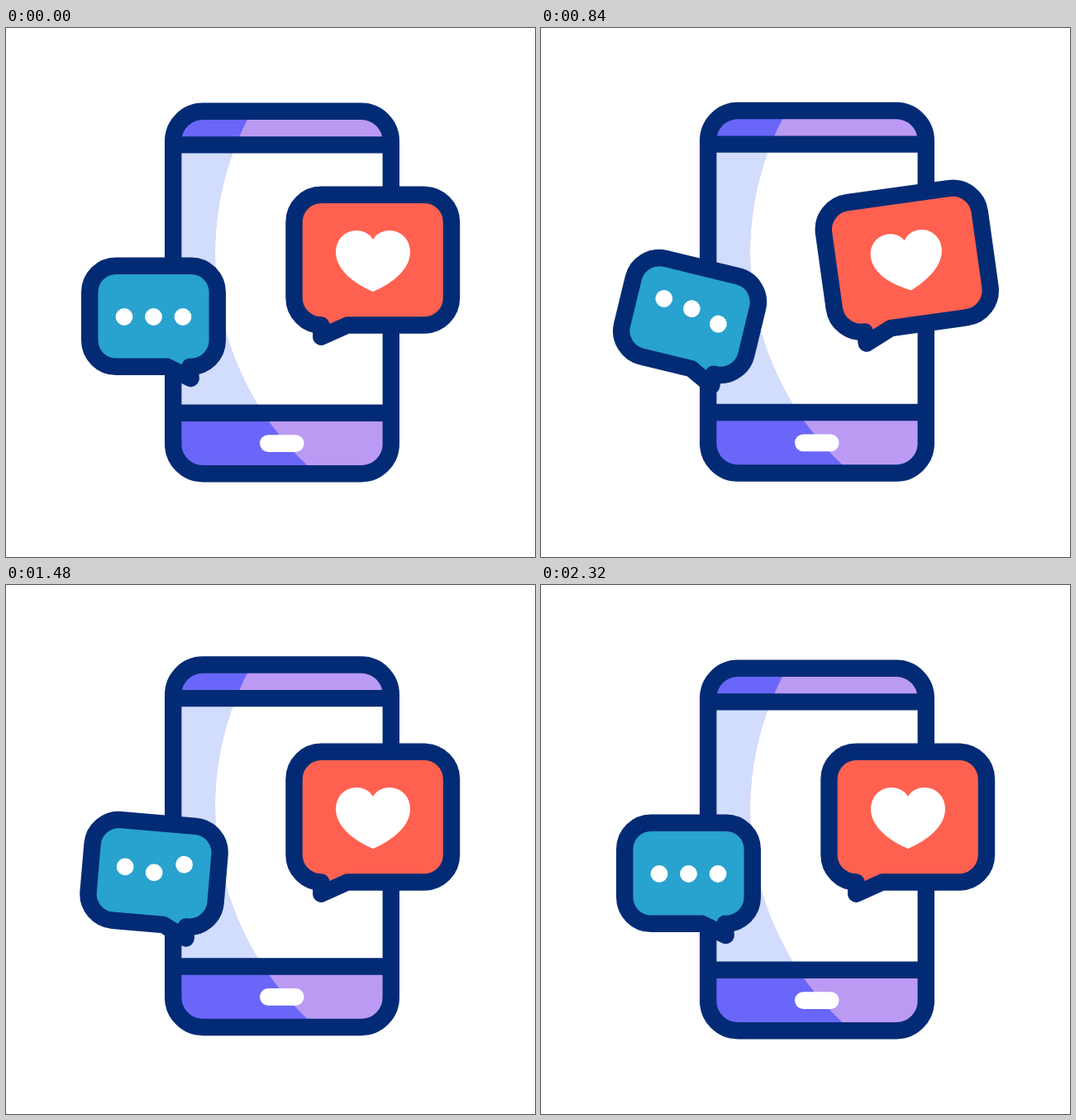
These frames come from a looping animation (640 by 640 pixels, 2440 ms). An HTML page:

```html
<!DOCTYPE html>
<html lang="en">
<head>
<meta charset="utf-8">
<title>Phone chat</title>
<style>
  html, body { margin: 0; width: 100%; height: 100%; overflow: hidden; background: #fff; }
  svg { display: block; width: 100vw; height: 100vh; }
  .line { stroke: #032b75; stroke-width: 20.4; stroke-linejoin: round; }
</style>
</head>
<body>
<svg viewBox="0 0 640 640">
  <defs>
    <clipPath id="case"><rect x="202.2" y="100.8" width="263.6" height="438.4" rx="36"/></clipPath>
  </defs>

  <g id="phone">
    <g clip-path="url(#case)">
      <rect x="192" y="90" width="284" height="460" fill="#6a66f9"/>
      <rect x="192" y="141" width="284" height="325" fill="#d2dcfd"/>
      <g clip-path="url(#case)">
        <circle cx="605" cy="272" r="352" fill="#bb9af3"/>
      </g>
      <clipPath id="screen"><rect x="192" y="141" width="284" height="325"/></clipPath>
      <circle cx="605" cy="272" r="352" fill="#fff" clip-path="url(#screen)"/>
    </g>
    <rect class="line" x="202.2" y="100.8" width="263.6" height="438.4" rx="36" fill="none"/>
    <path class="line" d="M202 141.4H466M202 465.8H466"/>
    <rect x="307" y="492.3" width="53.6" height="20.6" rx="10.3" fill="#fff"/>
  </g>

  <g id="chat">
    <path class="line" fill="#28a2ce" d="M133.2 287.7H223.8A32 32 0 0 1 255.8 319.7V377.8
      A32 32 0 0 1 222.5 409.8L223.7 424L195 409.8H133.2A32 32 0 0 1 101.2 377.8V319.7A32 32 0 0 1 133.2 287.7Z"/>
    <g fill="#fff">
      <circle class="dot" cx="143" cy="349.5" r="10.4"/>
      <circle class="dot" cx="178.5" cy="349.5" r="10.4"/>
      <circle class="dot" cx="214" cy="349.5" r="10.4"/>
    </g>
  </g>

  <g id="like">
    <path class="line" fill="#ff6150" d="M381.5 201.8H506A33 33 0 0 1 539 234.8V326.5A33 33 0 0 1 506 359.5
      H413L381.3 373.8V359.5A33 33 0 0 1 348.5 326.5V234.8A33 33 0 0 1 381.5 201.8Z"/>
    <path id="heart" fill="#fff" d="M444 319C436 315.5 399 299 399 271C399 256 410 245 424 245
      C433 245 440 249 444 256C448 249 455 245 464 245C478 245 489 256 489 271C489 299 452 315.5 444 319Z"/>
  </g>
</svg>

<script>
  const LOOP = 2440, STEP = 40, SWING = 16.5, HOP = 16;
  const $ = id => document.getElementById(id);
  const dots = [...document.querySelectorAll('.dot')];
  const ease = u => u * u * (3 - 2 * u);

  // Eased value at time t from [time, value] keys.
  function at(keys, t) {
    if (t <= keys[0][0]) return keys[0][1];
    for (let i = 1; i < keys.length; i++) {
      const [a, from] = keys[i - 1], [b, to] = keys[i];
      if (t < b) return from + (to - from) * ease((t - a) / (b - a));
    }
    return keys[keys.length - 1][1];
  }

  // Two runs of left-right-left-right swings, 1040 ms apart.
  const wiggle = start => [start, start + 1040].flatMap(s =>
    [0, -SWING, SWING, -SWING, SWING, 0].map((deg, i) => [s + i * 150, deg]));

  const lift = [[200, 0], [600, 13], [1200, -26], [1720, 13], [2160, 0]];
  const chatTurn = wiggle(200);
  const likeTurn = wiggle(440);
  const beat = [[440, 1], [640, 1.2], [840, 0.96], [1040, 1.2], [1240, 0.955], [1440, 1],
                [1480, 1], [1680, 1.2], [1880, 0.94], [2080, 1.2], [2240, 1]];

  // Four hops of 400 ms, each dot 120 ms after the one before.
  function hop(t, i) {
    const s = t - 200 - i * 120;
    if (s < 0 || s >= 1600) return 0;
    return -HOP * ease(1 - Math.abs(s % 400 - 200) / 200);
  }

  const set = (el, value) => el.setAttribute('transform', value);

  function draw(now) {
    const t = Math.floor((now % LOOP) / STEP + 1e-6) * STEP;
    set($('phone'), `translate(0 ${at(lift, t)})`);
    set($('chat'), `rotate(${at(chatTurn, t)} 178.5 355.5)`);
    set($('like'), `rotate(${at(likeTurn, t)} 443.7 287.7)`);
    set($('heart'), `translate(444 282) scale(${at(beat, t)}) translate(-444 -282)`);
    dots.forEach((dot, i) => set(dot, `translate(0 ${hop(t, i)})`));
  }

  let begin;
  function tick() {
    const now = performance.now();
    begin ??= now;
    draw(now - begin);
    requestAnimationFrame(tick);
  }
  tick();
</script>
</body>
</html>
```
